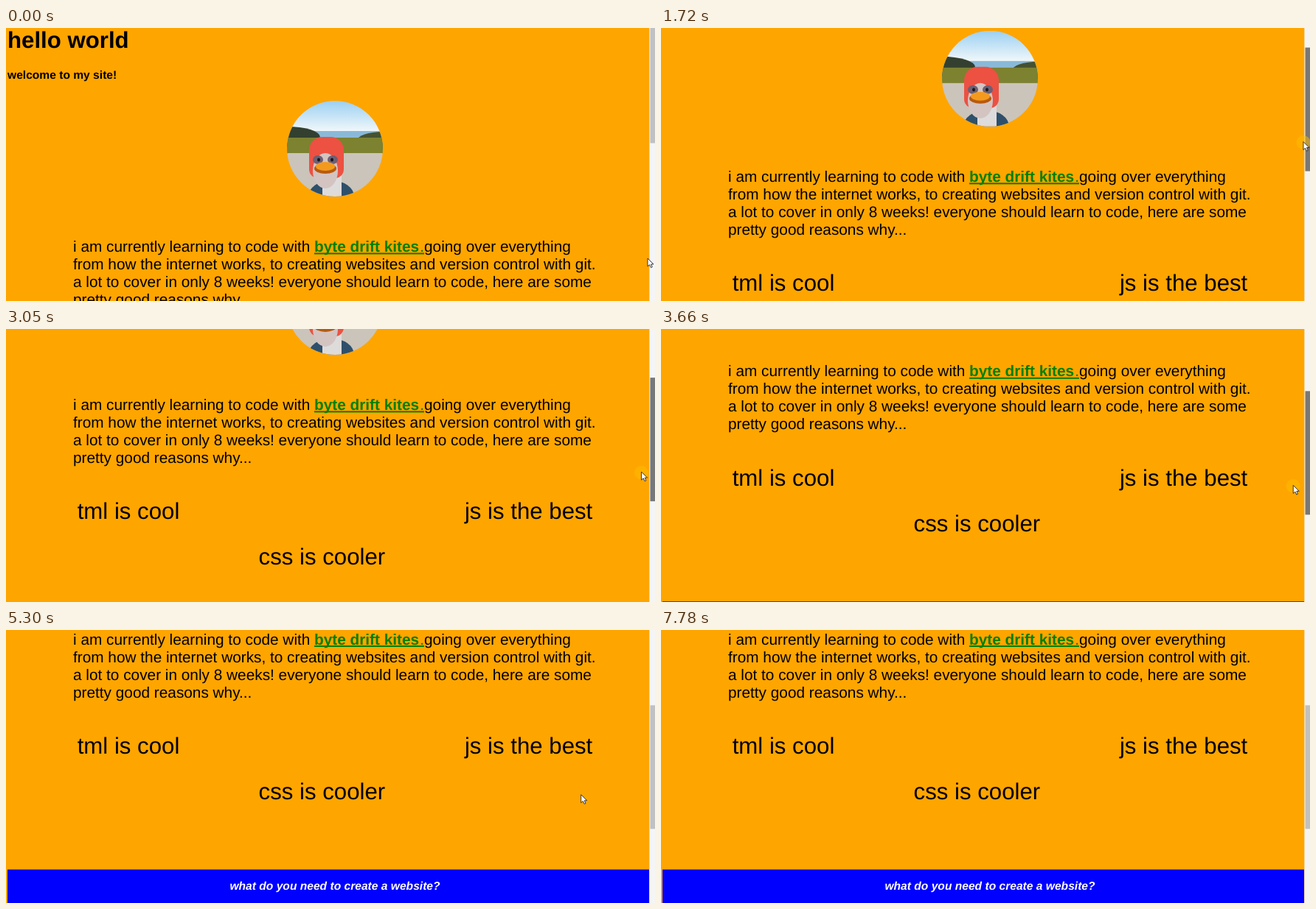
These frames come from a looping animation (880x371 px, 8 s). An HTML page with a canvas:

```html
<!DOCTYPE html>
<html lang="en">
<head>
<meta charset="utf-8">
<title>hello world</title>
<style>
html, body { margin: 0; width: 100%; height: 100%; overflow: hidden; background: #ffa500; }
canvas { display: block; width: 880px; height: 371px; }
</style>
</head>
<body>
<canvas id="stage" width="880" height="371"></canvas>
<script>
const ctx = document.getElementById('stage').getContext('2d');
const W = 880, H = 371, LOOP = 8000;
const FONT = '"Liberation Sans", Arial, sans-serif';
const EM = 15.6, LINE = 24, PAGE = 870, MID = 446;
const GRAB = 890, RELEASE = 4900;

// Scroll offset over time, straight between the points
const scrollKeys = [[860, 0], [1200, 42], [2190, 143], [3050, 194], [4200, 280], [4700, 284.5]];

const paragraph = [
  'from how the internet works, to creating websites and version control with git.',
  'a lot to cover in only 8 weeks! everyone should learn to code, here are some',
  'pretty good reasons why...'
];

const clamp = k => Math.min(1, Math.max(0, k));

function ease(t, start, len) {
  const k = clamp((t - start) / len);
  return k * k * (3 - 2 * k);
}

function scrollAt(t) {
  let y = 0;
  for (let i = 1; i < scrollKeys.length; i++) {
    const [t0, y0] = scrollKeys[i - 1], [t1, y1] = scrollKeys[i];
    y += (y1 - y0) * clamp((t - t0) / (t1 - t0));
  }
  return y;
}

function text(str, x, y, size, { style = '', color = '#000', align = 'left' } = {}) {
  ctx.font = `${style} ${size}px ${FONT}`;
  ctx.fillStyle = color;
  ctx.textAlign = align;
  ctx.fillText(str, x, y);
}

function rect(x, y, w, h, color) {
  ctx.fillStyle = color;
  ctx.fillRect(x, y, w, h);
}

function oval(x, y, rx, ry, color) {
  ctx.beginPath();
  ctx.ellipse(x, y, rx, ry, 0, 0, Math.PI * 2);
  ctx.fillStyle = color;
  ctx.fill();
}

function photo(x, y, r) {
  ctx.save();
  ctx.translate(x, y);
  ctx.beginPath();
  ctx.arc(0, 0, r, 0, Math.PI * 2);
  ctx.clip();

  const sky = ctx.createLinearGradient(0, -r, 0, -24);
  sky.addColorStop(0, '#9bd0f2');
  sky.addColorStop(1, '#f0f7fa');
  rect(-r, -r, 2 * r, r, sky);
  rect(-r, -24, 2 * r, 10, '#8ab9d8');
  oval(-r, -16, 45, 14, '#33402f');
  oval(r, -11, 35, 12, '#46522f');
  rect(-r, -15, 2 * r, 22, '#7c8230');
  rect(-r, 6, 2 * r, r, '#cbc4ba');

  oval(-5, r, 31, 22, '#2e506b');
  rect(-17, 20, 26, r, '#dedbdb');
  ctx.fillStyle = '#ec5142';
  ctx.beginPath();
  ctx.roundRect(-35, -16, 47, 56, [18, 18, 12, 12]);
  ctx.fill();
  oval(-13, 30, 17, 24, '#d3c4c2');
  for (const side of [-1, 1]) {
    oval(-13 + side * 10, 15, 7, 6, '#6d5f74');
    oval(-13 + side * 9, 15, 2, 2.5, '#17171d');
  }
  oval(-13, 27, 15, 7, '#b65a12');
  oval(-13, 24, 13, 6, '#f39a1d');
  ctx.restore();
}

function intro(x, y) {
  const size = EM * 4 / 3, link = 418, next = 567, color = '#008000';
  text('i am currently learning to code with', x, y, size);
  text('byte drift kites', link, y, size, { style: 'bold', color });
  text('.', next - 5.8, y, size, { color });
  rect(link, y + 1.5, next - link, 2, color);
  text('going over everything', next, y, size);
  paragraph.forEach((str, i) => text(str, x, y + LINE * (i + 1), size));
}

function words(grow) {
  const size = EM * 2, mid = 428.4, spread = 8.5 * grow, align = 'center';
  text('tml is cool', 166 - spread, 452.5, size, { align });
  text('js is the best', 708.6 + spread, 452.5, size, { align });
  text('css is cooler', mid, 514.3 + 5.5 * grow, size * (1 + 0.2 * grow), { align });
}

function scrollbar(t, scroll, dragging) {
  const hovered = t >= 390 && t < GRAB;
  rect(872.4, 0, 8, H, '#f5f5f5');
  rect(873.5, scroll * 0.4 - 11.5, 7, 168, dragging ? '#787878' : hovered ? '#a8a8a8' : '#c1c1c1');
}

function arrow(x, y, dragging) {
  if (dragging) oval(x, y + 1, 9.5, 9.5, 'rgba(255,190,0,0.5)');
  ctx.save();
  ctx.translate(x, y);
  ctx.fill(pointer);
  ctx.fillStyle = '#fff';
  ctx.fill(pointer);
  ctx.strokeStyle = '#222';
  ctx.lineWidth = 0.9;
  ctx.stroke(pointer);
  ctx.restore();
}
const pointer = new Path2D('M0 0V11L2.6 8.7L4.5 12.6L6.3 11.8L4.6 8H8Z');

function cursor(t, scroll, dragging) {
  if (t < 70) return arrow(870, 313, false);
  if (t < GRAB) return;
  // The hand holds the thumb, then glides to the middle word and leaves
  const come = ease(t, 5000, 900), go = ease(t, 6800, 800);
  arrow(880 - 0.095 * scroll - 281 * come + 320 * go, 116.5 + 0.4 * scroll - 25 * come + 16 * go, dragging);
}

function draw(t) {
  const scroll = scrollAt(t);
  const dragging = t >= GRAB && t < RELEASE;
  const grow = ease(t, 5620, 280) - ease(t, 7120, 400);
  const bar = 610 + 7.5 * grow;

  rect(0, 0, W, H, '#ffa500');
  ctx.save();
  ctx.translate(0, -scroll);
  text('hello world', 2, 26.5, EM * 2, { style: 'bold' });
  text('welcome to my site!', 2, 69, EM, { style: 'bold' });
  photo(MID, 164, 65);
  intro(91, 304);
  words(grow);
  rect(2, bar, PAGE, H, '#0000ff');
  text('what do you need to create a website?', MID, bar + 27.5, EM,
    { style: 'italic bold', color: '#fff', align: 'center' });
  ctx.restore();

  scrollbar(t, scroll, dragging);
  cursor(t, scroll, dragging);
}

ctx.textRendering = 'geometricPrecision';
const start = performance.now();
function tick() {
  draw((performance.now() - start) % LOOP);
  requestAnimationFrame(tick);
}
tick();
</script>
</body>
</html>
```
